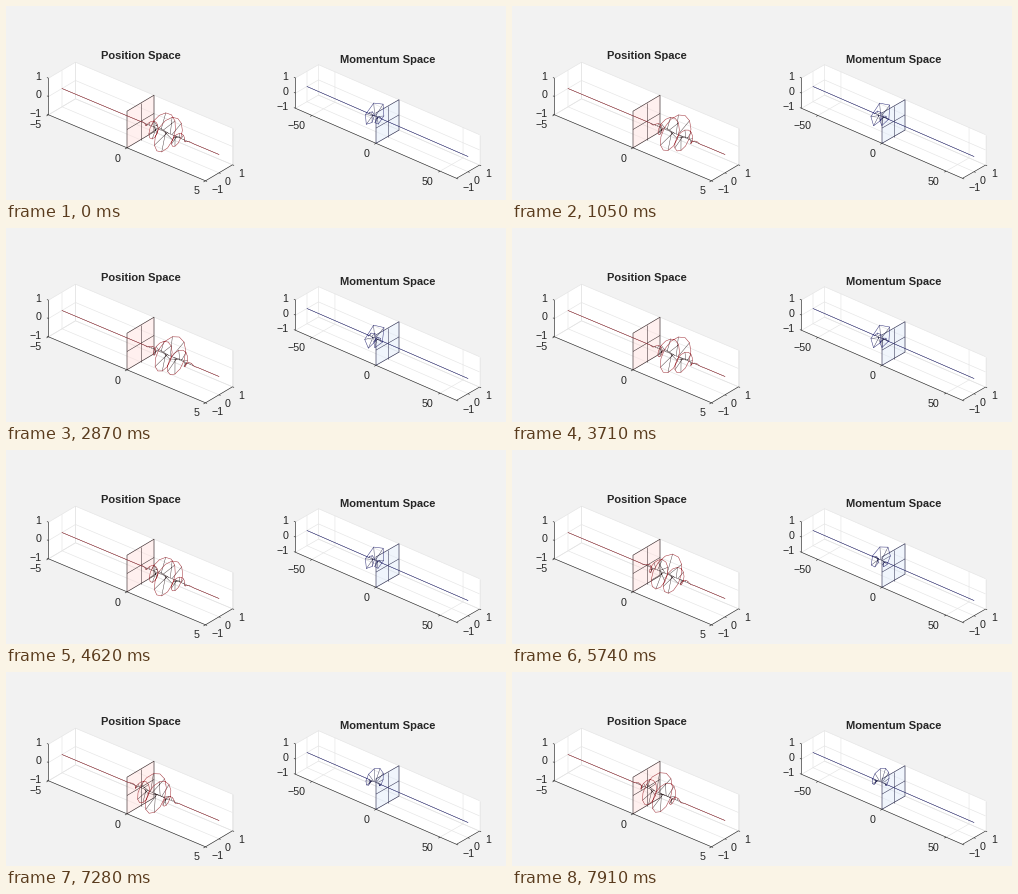
Write a matplotlib script that moves like this. It is 500 px wide and 194 px high and loops after 8 s.

```python
import numpy as np
import matplotlib.pyplot as plt
from matplotlib.animation import FuncAnimation
from matplotlib.patches import Polygon

W, H, DPI = 500, 194, 100
PX = 72 / DPI                      # points per pixel
FRAMES, INTERVAL, UPDATES = 100, 80, 48
INK, GRID = "#262626", "#e4e4e4"
K0, SIGMA = -10.0, 0.55            # carrier wave number, packet width
X_MAX, DX = 5.0, 0.05
DK, K_MAX = np.pi / X_MAX, np.pi / DX

fig = plt.figure(figsize=(W / DPI, H / DPI), dpi=DPI, facecolor="#f2f2f2")
ax = fig.add_axes([0, 0, 1, 1])
ax.set(xlim=(0, W), ylim=(H, 0))
ax.axis("off")


def write(x, y, text, size=10.6, **style):
    ax.text(x, y, text.replace("-", "\u2212"), fontsize=size * PX, family="Liberation Sans",
            color=INK, va="center_baseline", zorder=9, **style)


class Space:
    """Orthographic box with axes running from -1 to 1 along u, v and w."""

    def __init__(self, title, title_y, center, basis, color, tint, edge, ticks, stem_step):
        self.center, self.basis = np.array(center), np.array(basis)
        self.stem_step = stem_step
        self.draw_box()
        self.draw_ticks(ticks)
        self.draw_plane(edge, tint)
        write(center[0], title_y, title, 11.1, weight="bold", ha="center")
        self.line([(-1, 0, 0), (1, 0, 0)], edge, 0.3, 5)
        self.stems, = ax.plot([], [], color=edge, lw=0.4 * PX, zorder=6)
        self.curve, = ax.plot([], [], color=color, lw=0.5 * PX, zorder=7)

    def project(self, points):
        return self.center + np.asarray(points, float) @ self.basis

    def line(self, points, color, width, z):
        ax.plot(*self.project(points).T, color=color, lw=width * PX, zorder=z,
                solid_capstyle="butt")

    def face(self, corners, color, z, **style):
        ax.add_patch(Polygon(self.project(corners), fc=color, zorder=z, **style))

    def draw_box(self):
        walls = [[(-1, 1, -1), (1, 1, -1), (1, 1, 1), (-1, 1, 1)],
                 [(-1, -1, -1), (-1, 1, -1), (-1, 1, 1), (-1, -1, 1)],
                 [(-1, -1, -1), (1, -1, -1), (1, 1, -1), (-1, 1, -1)]]
        for wall in walls:
            self.face(wall, "white", 1, ec="none")
        for s in (-1, 0, 1):
            self.line([(-1, -1, s), (-1, 1, s), (1, 1, s)], GRID, 0.6, 2)
            self.line([(-1, s, 1), (-1, s, -1), (1, s, -1)], GRID, 0.6, 2)
        self.line([(1, 1, -1), (1, 1, 1)], GRID, 0.6, 2)
        self.line([(-1, -1, 1), (-1, -1, -1), (1, -1, -1), (1, 1, -1)], INK, 0.6, 3)

    def tick(self, start, end, text, dx, dy):
        self.line([start, end], INK, 0.6, 3)
        x, y = self.project(start)
        write(x + dx, y + dy, text, ha="right" if dx < 0 else "left")

    def draw_ticks(self, ticks):
        for text, u in ticks.items():
            self.line([(u, -1, -1), (u, 1, -1), (u, 1, 1)], GRID, 0.6, 2)
            self.tick((u, -1, -1), (u, -1.15, -1), text, -6.5, 9.7)
        for s in (-1, 0, 1):
            self.tick((1, s, -1), (1.02, s, -1), str(s), 6, 8.3)
            self.tick((-1, -1, s), (-1.02, -1, s), str(s), -7, -2)

    def draw_plane(self, edge, tint):
        square = [(0, -1, -1), (0, 1, -1), (0, 1, 1), (0, -1, 1)]
        self.face(square, tint, 4, alpha=0.5, ec="none")
        self.line(square + square[:1], edge, 0.6, 5)
        self.line([(0, -1, 0), (0, 1, 0)], edge, 0.5, 5)
        self.line([(0, 0, -1), (0, 0, 1)], edge, 0.5, 5)

    def show(self, u, wave):
        tips = np.column_stack([u, wave.imag, wave.real])
        self.curve.set_data(*self.project(tips).T)
        tips = tips[np.abs(wave) > 0.02][::self.stem_step]
        feet = tips * [1, 0, 0]
        gap = np.full((len(tips), 2), np.nan)
        spokes = np.stack([self.project(feet), self.project(tips), gap], axis=1)
        self.stems.set_data(*spokes.reshape(-1, 2).T)


position = Space("Position Space", 48.7, (134.5, 115.5), [(78.5, 33), (13.5, -8), (0, -18.3)],
                 "#a03038", "#ffe2e0", "#332426", {"-5": -1, "0": 0, "5": 1}, 2)
momentum = Space("Momentum Space", 52.7, (381.5, 115.5), [(80.5, 35), (11.5, -6.6), (0, -15.2)],
                 "#34347c", "#e2ecfa", "#2a2a4c",
                 {"-50": -50 / K_MAX, "0": 0, "50": 50 / K_MAX}, 1)

x = np.arange(-X_MAX, X_MAX + DX / 2, DX)
k = np.arange(-K_MAX, K_MAX + DK / 2, DK)


def packet(q, center, width, turns):
    """Gaussian envelope on a wave that winds at a steady rate."""
    return np.exp(-((q - center) / width) ** 2 / 2 + 1j * turns)


def update(frame):
    step = int(frame * UPDATES / FRAMES + 0.55)
    seconds = step * FRAMES * INTERVAL / UPDATES / 1000
    x0 = 1.31 + 0.62 * np.cos(0.47 * (seconds - 2.3))
    position.show(x / X_MAX, packet(x, x0, SIGMA, -K0 * x))
    momentum.show(k / K_MAX, 0.88 * packet(k, K0, 1 / SIGMA, (k - K0) * x0))
    return position.curve, position.stems, momentum.curve, momentum.stems


anim = FuncAnimation(fig, update, frames=FRAMES, interval=INTERVAL, repeat=True, repeat_delay=0)
plt.show()
```
